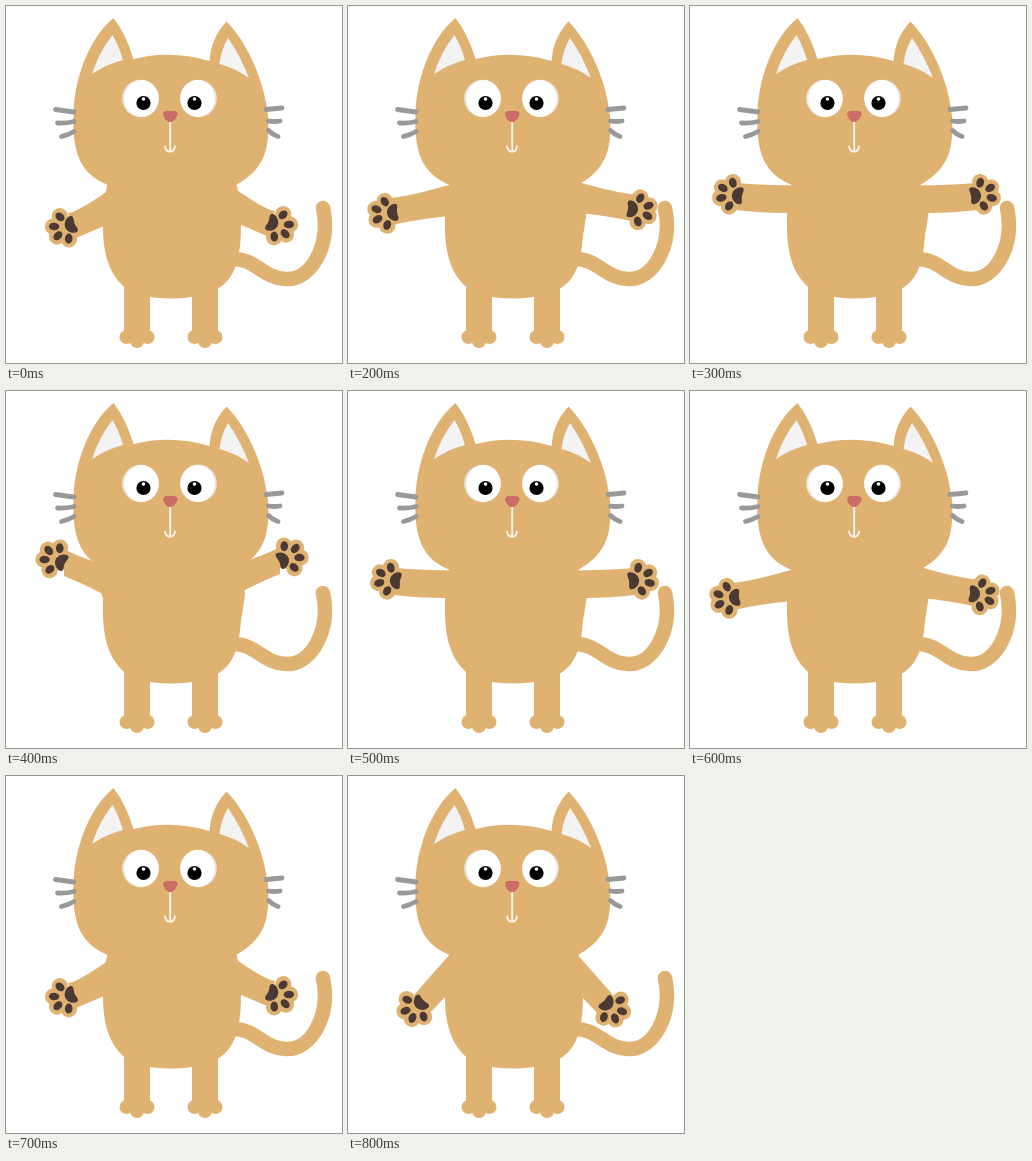
An HTML page for the animation above (900 ms loop, 336 by 357 pixels).

```html
<!DOCTYPE html>
<html lang="en">
<head>
<meta charset="utf-8">
<title>Waving cat</title>
<style>
  html, body { margin: 0; width: 100%; height: 100%; overflow: hidden; background: #fff; }
  svg { display: block; width: 100%; height: 100%; }
</style>
</head>
<body>
<svg viewBox="0 0 336 357">
  <defs>
    <g id="foot">
      <path d="M-13 270H13V333H-13Z"/>
      <circle cx="-10.5" cy="331" r="7"/>
      <circle cx="0" cy="335" r="7"/>
      <circle cx="10.5" cy="331" r="7"/>
    </g>
    <!-- Paw with the toes pointing left -->
    <g id="paw">
      <path d="M-8-9H9Q15-10 16 0Q15 10 9 9H-8Z"/>
      <circle cx="2" cy="-12.3" r="8.2"/>
      <circle cx="-8" cy="-5.3" r="8.2"/>
      <circle cx="-8" cy="5.3" r="8.2"/>
      <circle cx="2" cy="12.3" r="8.2"/>
      <g fill="#4b3a34">
        <path d="M3 0C3-5 8-9 12-8.5Q15-8 13.4-3Q12.6 0 13.4 3Q15 8 12 8.5C8 9 3 5 3 0Z"/>
        <ellipse rx="5" ry="3.8" transform="translate(2-11.7)rotate(65)"/>
        <ellipse rx="5.2" ry="3.8" transform="translate(-7-5)rotate(25)"/>
        <ellipse rx="5.2" ry="3.8" transform="translate(-7 5)rotate(-25)"/>
        <ellipse rx="5" ry="3.8" transform="translate(2 11.7)rotate(-65)"/>
      </g>
    </g>
    <g id="limb">
      <path id="arm"/>
      <use id="hand" href="#paw"/>
    </g>
  </defs>

  <g fill="#dfb271">
    <path d="M225 253C250 252 256 272 280 273C305 274 325 240 317 202" fill="none" stroke="#dfb271" stroke-width="14.5" stroke-linecap="round"/>
    <use href="#foot" x="131"/>
    <use href="#foot" x="199"/>
    <path d="M102 176Q96 200 97 222C97 255 108 279 130 288Q165 297 200 288C229 279 235 255 235 218Q235 195 230 176Z"/>
    <path id="side" d="M228 186H237L239 203Q237 220 234 235H226Z"/>
    <use href="#limb"/>
    <use id="right" href="#limb"/>
    <path d="M67.5 108C68 75 82 33 107.5 12Q120 28 127.5 53Q165 43.5 203.5 55Q205 32 220.5 15.500C238 33 258 70 262 110C264 145 258 163 230 179H102C74 168 66 146 67.5 108Z"/>
  </g>

  <g fill="#f3f3f3">
    <path d="M106.5 29Q113 40 117 54Q101 58 86 68Q93 46 106.5 29Z"/>
    <path d="M222 32Q234 49 243 72Q229 62 213.5 58Q215 44 222 32Z"/>
  </g>

  <g fill="#e9e5df">
    <ellipse cx="134.500" cy="92.500" rx="18.300" ry="18.700"/>
    <ellipse cx="192.500" cy="92.500" rx="18.300" ry="18.700"/>
  </g>
  <g fill="#fff">
    <ellipse cx="135.500" cy="92.500" rx="17.300" ry="18.500"/>
    <ellipse cx="191.500" cy="92.500" rx="17.300" ry="18.500"/>
  </g>
  <circle cx="137.500" cy="97" r="7.100"/>
  <circle cx="188.500" cy="97" r="7.100"/>
  <circle cx="137.500" cy="93" r="1.800" fill="#fff"/>
  <circle cx="188.500" cy="93" r="1.800" fill="#fff"/>

  <path d="M164.200 116V145M159 140.500Q160 146 164.200 145.500Q168 146 169 140.500" fill="none" stroke="#faf5ec" stroke-width="1.800" stroke-linecap="round"/>
  <path d="M160 105H168.500Q173 106 171 110Q168 116 164.200 116Q160 116 157.500 110Q156 106 160 105Z" fill="#cc6c66"/>
  <path d="M49.500 103.500L68 106M51.500 117Q60 117.500 68 115.500M55.500 130.500Q62 129 68 125.500M260 103.500L276 102M262.500 115Q268 116 274 115M262.500 124.500Q267 129 272 130.500" fill="none" stroke="#999" stroke-width="4.800" stroke-linecap="round"/>
</svg>

<script>
  const $ = id => document.getElementById(id);

  // paw: x, y, turn; arm: outline of the left limb;
  // mirror: x sum and y shift that give the right limb
  const low = {
    paw: [56.5, 222.5, -22], mirror: [331, -2],
    arm: "M62 207Q72 206 103 184L112 214L98 220L70 232Z"
  };
  const out = {
    paw: [36, 207.5, -6], mirror: [329, -3.5], raised: true,
    arm: "M42 192Q62 190 97 180L110 177V209L97 210.5Q70 213 44 219Z"
  };
  const level = {
    paw: [39, 188, 9], mirror: [333, 0], raised: true,
    arm: "M47 177Q72 179 110 179.5V207H97Q70 207 46 204Z"
  };
  const high = {
    paw: [47, 167, 25], mirror: [332, -2], raised: true,
    arm: "M58 158Q71 165 92 172L112 180V206L97 207L95 202Q78 193 58 185Z"
  };
  const down = {
    paw: [66, 233.5, -44], mirror: [331.5, .5],
    arm: "M66 219L103 177L116 210L98 220L78 241Z"
  };

  const STEP = 100;
  const cycle = [low, low, out, level, high, level, out, low, down];

  function draw(ms) {
    const pose = cycle[Math.floor(ms / STEP) % cycle.length];
    const [x, y, turn] = pose.paw;
    const [sum, shift] = pose.mirror;
    $("arm").setAttribute("d", pose.arm);
    $("hand").setAttribute("transform", `translate(${x} ${y}) rotate(${turn})`);
    $("right").setAttribute("transform", `translate(${sum} ${shift}) scale(-1 1)`);
    $("side").setAttribute("visibility", pose.raised ? "visible" : "hidden");
  }

  const start = performance.now();
  function tick() {
    draw(performance.now() - start);
    requestAnimationFrame(tick);
  }
  tick();
</script>
</body>
</html>
```
